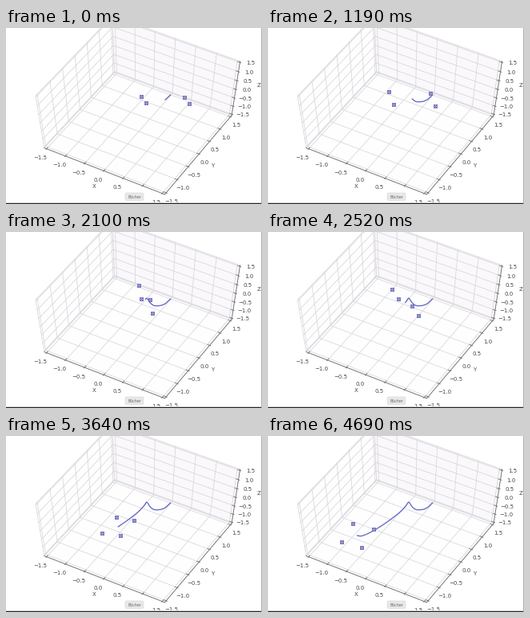
A matplotlib script for the animation above (4.76 s loop, 320 by 221 pixels).

```python
import numpy as np
import matplotlib.pyplot as plt
from matplotlib.animation import FuncAnimation
from matplotlib.patches import FancyBboxPatch, Polygon, Rectangle

W, H, DPI = 320, 221, 100
STEP_MS, FRAMES = 70, 68
HOLDS = (10, 18, 33, 48, 55)  # frames that repeat the previous pose
PX = 72 / DPI                 # one pixel in points
L = 1.5625                    # half width of the plot box
TICKS = np.arange(-1.5, 1.6, 0.5)
GRID, AXIS, TEXT = "#d9d6dc", "#6a6a6a", "#484848"

# Waypoints of the flight: step, x, y
ROUTE = np.array([
    [-5, 205.5, 84], [0, 199, 90], [9, 186, 92.6], [16, 180.3, 89],
    [23, 176.3, 83.3], [33, 171.8, 88.5], [39, 164.5, 96],
    [48, 140.3, 113.8], [58, 116.5, 125.6], [62, 111.5, 125],
])
KEY_T, KEY_P = ROUTE[:, 0], ROUTE[:, 1:]
KEY_V = np.gradient(KEY_P, KEY_T, axis=0)


def centre(s):
    """Smooth position along the route, shape (n, 2)."""
    s = np.atleast_1d(s).astype(float)
    i = np.clip(np.searchsorted(KEY_T, s, side="right") - 1, 0, len(KEY_T) - 2)
    h = (KEY_T[i + 1] - KEY_T[i])[:, None]
    u = (s - KEY_T[i])[:, None] / h
    return ((1 + 2 * u) * (1 - u)**2 * KEY_P[i] + u * (1 - u)**2 * h * KEY_V[i]
            + u**2 * (3 - 2 * u) * KEY_P[i + 1] + u**2 * (u - 1) * h * KEY_V[i + 1])


def ease(s, a, b):
    u = np.clip((s - a) / (b - a), 0, 1)
    return u * u * (3 - 2 * u)


def bell(s, mid, width):
    return np.exp(-((s - mid) / width)**2)


def rotors(s):
    """Ends of the two crossed arms at step s."""
    first = 1 - ease(s, 15, 23)
    swing = bell(s, 32.5, 5)
    dip = bell(s, 46, 4.5)
    last = ease(s, 39, 48)
    settle = ease(s, 56, 62)
    long_arm = np.array([2.5 + 27.5 * first + 14 * swing + 3 * settle,
                         18 - first * (13.5 - s / 4) - 1.5 * swing
                         - 8 * dip - 3 * settle])
    short_arm = np.array([3 + 21 * first + 5.5 * swing + 17 * last,
                          -2.5 - first * (1 + s / 4) + 7.5 * swing - 5.5 * last])
    return centre(s) + [-long_arm, -short_arm, short_arm, long_arm]


def project(x, y, z):
    """Perspective camera at elevation 60, azimuth -60."""
    p = np.array([x, y, z]) / (2 * L)
    c, s = 0.5, np.sqrt(3) / 2
    depth = 10 - p @ [c * c, -c * s, s]
    return np.array([166 + 1790 * (p @ [s, c, 0]) / depth,
                     98 - 1330 * (p @ [-s * c, s * s, c]) / depth])


fig = plt.figure(figsize=(W / DPI, H / DPI), dpi=DPI, facecolor="white")
ax = fig.add_axes([0, 0, 1, 1])
ax.set_xlim(0, W)
ax.set_ylim(H, 0)
ax.axis("off")


def segment(a, b, color, z):
    (x0, y0), (x1, y1) = project(*a), project(*b)
    ax.plot([x0, x1], [y0, y1], color=color, lw=0.8 * PX, zorder=z)


def label(pos, text, size=7, color=TEXT, z=5):
    ax.text(*pos, text, fontsize=size * PX, color=color, ha="center",
            va="center", family="DejaVu Sans", zorder=z)


def pane(corners, shade):
    ax.add_patch(Polygon([project(*c) for c in corners], fc=shade,
                         ec=GRID, lw=0.8 * PX, zorder=1))


pane([(-L, -L, -L), (-L, L, -L), (-L, L, L), (-L, -L, L)], "#fefefe")
pane([(-L, L, -L), (L, L, -L), (L, L, L), (-L, L, L)], "#faf8fb")
pane([(-L, -L, -L), (L, -L, -L), (L, L, -L), (-L, L, -L)], "#fefefe")

OUT, IN = L * (1 + 1 / 60), L * (1 - 1 / 30)
for t in TICKS:
    for a, b, c in (((t, -L, -L), (t, L, -L), (t, L, L)),
                    ((L, t, -L), (-L, t, -L), (-L, t, L)),
                    ((L, L, t), (-L, L, t), (-L, -L, t))):
        segment(a, b, GRID, 2)
        segment(b, c, GRID, 2)
    segment((t, -OUT, -L), (t, -IN, -L), AXIS, 4)
    segment((OUT, t, -L), (IN, t, -L), AXIS, 4)
    segment((OUT, L, t), (IN, L, t), AXIS, 4)
    text = f"{t:.1f}".replace("-", "\u2212")
    label(project(t, -L, -L) + [-7.5, 11.5], text)
    label(project(L, t, -L) + [7, 11], text)
    label(project(L, L, t) + [13.5, 1], text)

for a, b in (((-L, -L, -L), (L, -L, -L)), ((L, -L, -L), (L, L, -L)),
             ((L, L, -L), (L, L, L))):
    segment(a, b, AXIS, 3)
label((110.5, 199), "X")
label((258, 173), "Y")
label((316, 72), "Z")

# Tooltip and window edge
ax.add_patch(FancyBboxPatch((149, 207), 23, 9.5, boxstyle="round,pad=0,rounding_size=2",
                            fc="#e8e8e8", ec="#d8d8d8", lw=0.6 * PX, zorder=8))
label((160.5, 212), "B\u00fccher", 4.8, "#666666", 9)
ax.add_patch(Rectangle((0, 218.5), W, 1, fc="#d0d0d0", lw=0, zorder=10))
ax.add_patch(Rectangle((0, 219.5), W, 2, fc="#222222", lw=0, zorder=10))
ax.add_patch(Rectangle((W - 1, 0), 1, H, fc="#b0b0b0", lw=0, zorder=10))

trail, = ax.plot([], [], color="#6067c6", lw=1.3 * PX, zorder=6,
                 solid_joinstyle="round")
style = dict(ls="", mfc="#dcdcf0", mec="#6262b2", mew=0.8 * PX, zorder=7)
squares, = ax.plot([], [], marker="s", ms=4.8 * PX, **style)
crosses, = ax.plot([], [], marker="x", ms=4.2 * PX, **style)


def update(n):
    step = n - sum(h <= n for h in HOLDS)
    points = rotors(step)
    trail.set_data(*centre(np.linspace(KEY_T[0], step, 200)).T)
    squares.set_data(*points.T)
    crosses.set_data(*points.T)
    return trail, squares, crosses


anim = FuncAnimation(fig, update, frames=FRAMES, interval=STEP_MS,
                     repeat=True, repeat_delay=0)
plt.show()
```
